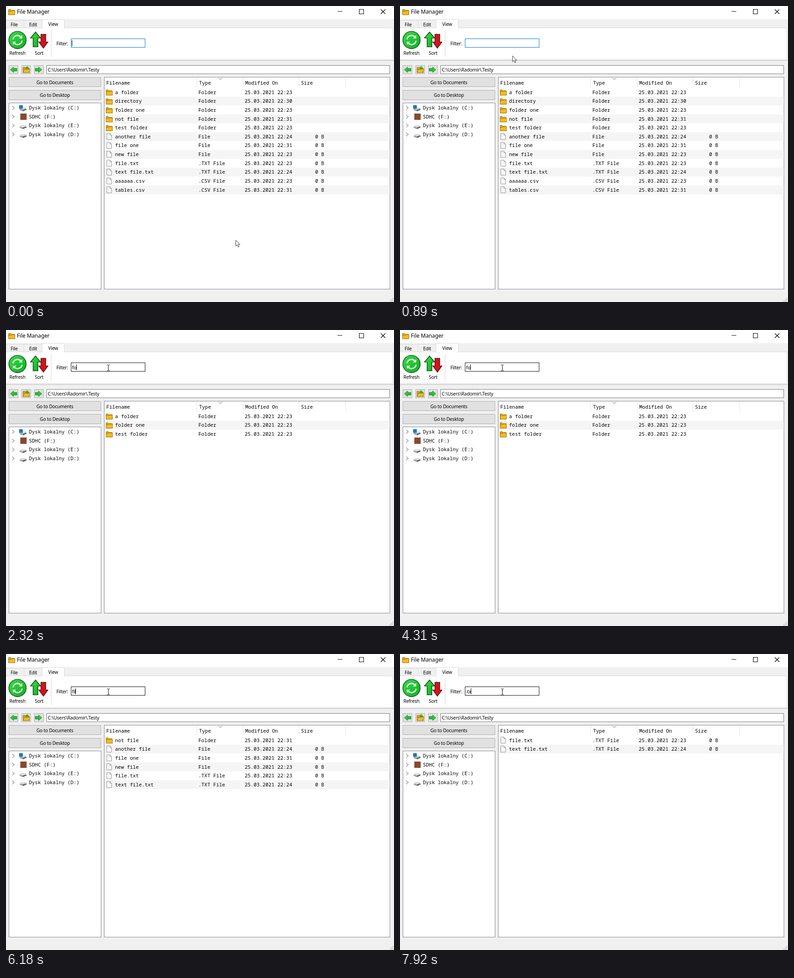
These frames come from a looping animation (855 px wide and 655 px high, 8 s). An HTML page:

```html
<!DOCTYPE html>
<html lang="en">
<head>
<meta charset="utf-8">
<title>File Manager</title>
<style>
  html, body { margin: 0; width: 100%; height: 100%; overflow: hidden; background: #f0f0f0; }
  svg { display: block; width: 855px; height: 655px; }
  text { white-space: pre; fill: #000; }
  .ui { font: 10.4px "Noto Sans", "Open Sans", sans-serif; letter-spacing: -.27px; }
  .path { letter-spacing: -.17px; }
  .title { font: 11.8px "Noto Sans", "Open Sans", sans-serif; }
  .mono { font: 10.92px "Noto Sans Mono", "DejaVu Sans Mono", monospace; }
  .mid { text-anchor: middle; }
</style>
</head>
<body>
<svg viewBox="0 0 855 655" xmlns="http://www.w3.org/2000/svg">
  <defs>
    <linearGradient id="green" x1="0" y1="0" x2="1" y2="1">
      <stop offset="0" stop-color="#35e044"/><stop offset="1" stop-color="#0fae22"/>
    </linearGradient>
    <linearGradient id="steel" x1="0" y1="0" x2="0" y2="1">
      <stop offset="0" stop-color="#c4c4c4"/><stop offset="1" stop-color="#777"/>
    </linearGradient>
    <g id="folder" stroke="#9a7310" stroke-width=".9">
      <path d="M.5 12.5V1.2Q.5.5 1.2.5H5L6.5 2.3H13.4Q14.5 2.3 14.5 3.4V12.5Z" fill="#d9a414"/>
      <path d="M.5 12.5V4.8H6L7.3 3.6H14.5V12.5Z" fill="#f1bb20"/>
    </g>
    <g id="page" stroke="#858585" stroke-width=".9">
      <path d="M.5.5H7.6L11.2 4.2V14.2H.5Z" fill="#f8f8f8"/>
      <path d="M7.6.5V4.2H11.2" fill="#ddd"/>
    </g>
    <g id="drive">
      <path d="M0 3.4L3.5.5H13L15 3Z" fill="#d2d2d2"/>
      <path d="M0 3.4L8 4.8L15 3V5.4L8 8.4L0 5.6Z" fill="#4c4c4c"/>
      <path d="M0 3.4L8 4.8V8.4L0 5.6Z" fill="url(#steel)"/>
      <path d="M10.5 5.6l2-.7" stroke="#49d14f" stroke-width="1.1"/>
    </g>
    <path id="arrow" d="M0 0L7.2-6V-2.9H14.5V2.9H7.2V6Z" fill="url(#green)" stroke="#14701c" stroke-width=".8"/>
  </defs>
  <g id="chrome"></g>
  <g id="list"></g>
  <rect id="address" x="89.5" y="131.5" width="756" height="18.5" fill="#fff"/>
  <text class="ui path" x="92" y="145">C:\Users\Radomir\.Testy</text>
  <rect id="filter" x="143.5" y="72.5" width="163" height="19" fill="#fff"/>
  <text id="query" class="ui" x="145.6" y="87"></text>
  <rect id="caret" y="76" width="1" height="13"/>
  <path id="pointer" d="M0 .3V13.2L3 10.5L5.2 15.4L7.3 14.4L5.1 9.8H9.2Z" fill="#fff" stroke="#1c2a1f" stroke-width=".9"/>
  <path id="beam" d="M-3-6.5H-1L0-5.6L1-6.5H3M0-5.6V5.6M-3 6.5H-1L0 5.6L1 6.5H3" fill="none" stroke="#000"/>
</svg>
<script>
const $ = id => document.getElementById(id);
const LOOP = 8000, ROW = 19.645;

const text = (x, y, s, cls = 'ui') => `<text class="${cls}" x="${x}" y="${y}">${s}</text>`;
const box = (x, y, w, h, fill, stroke = 'none') =>
  `<rect x="${x}" y="${y}" width="${w}" height="${h}" fill="${fill}" stroke="${stroke}"/>`;
const path = (d, stroke, fill = 'none', w = 1) =>
  `<path d="${d}" stroke="${stroke}" fill="${fill}" stroke-width="${w}"/>`;
const use = (id, x, y, more = '') => `<use href="#${id}" transform="translate(${x} ${y}) ${more}"/>`;

function titleBar() {
  return box(0, 0, 855, 29, '#fff') + use('folder', 5, 7) + text(24, 17, 'File Manager', 'title') +
    path('M730.5 12H741M778.5 7.5H788V17.5H778.5ZM826 7.5L836 17.5M836 7.5L826 17.5', '#000', 'none', 1.1);
}

function ribbon() {
  const swirl = 'M-10-1.5A10 10 0 0 1 6.5-7.6';
  const head = 'M10.2-10.8V-3.6H3Z';
  const half = path(swirl, '#fff', 'none', 2.6) + path(head, 'none', '#fff');
  return box(-.5, 48.5, 853, 70, '#fff', '#dcdcdc') +
    box(-.5, 31.5, 40, 17, '#f0f0f0', '#d9d9d9') + box(39.5, 31.5, 40, 17, '#f0f0f0', '#d9d9d9') +
    path('M79.5 49.5V29.5H128.5V49.5', '#d9d9d9', '#fff') + box(80, 47.5, 48, 3, '#fff') +
    text(10.3, 44.5, 'File') + text(51, 44.5, 'Edit') + text(93, 44, 'View') +
    `<circle cx="25.4" cy="75.3" r="19.2" fill="url(#green)" stroke="#0e4215" stroke-width="1.3"/>` +
    `<g transform="translate(25.4 75.3)">${half}<g transform="rotate(180)">${half}</g></g>` +
    path('M65 57.5L76.5 71H70.3V90.5H59.7V71H53.8Z', '#0c2a0f', 'url(#green)', 1.2) +
    path('M77 62.5H87.7V79.5H92.5L82.4 93.5L72.2 79.5H77Z', '#430707', '#d0141b', 1.2) +
    text(25.2, 108, 'Refresh', 'ui mid') + text(73, 108, 'Sort', 'ui mid') +
    path('M99.5 54V112', '#d5d5d5') + text(111, 87, 'Filter:') +
    path('M0 121H855', '#a0a0a0') + path('M0 122H855', '#fafafa');
}

function navigation() {
  const buttons = [6.5, 34.5, 62.5].map(x => box(x, 131.5, 20, 18.5, '#e1e1e1', '#adadad')).join('');
  return buttons + use('arrow', 9.5, 141) + use('arrow', 79, 141, 'scale(-1 1)') +
    use('folder', 37, 135) + use('arrow', 46.5, 133, 'rotate(90) scale(.55)') +
    path('M37.5 147.5L40.5 140H52.5L50 147.5Z', '#9a7310', '#f1bb20', .9) +
    box(6.5, 158, 202.5, 20.5, '#e1e1e1', '#adadad') + text(107.7, 173, 'Go to Documents', 'ui mid') +
    box(6.5, 186.5, 202.5, 21, '#e1e1e1', '#adadad') + text(107.7, 201, 'Go to Desktop', 'ui mid');
}

function tree() {
  const names = ['Dysk lokalny (C:)', 'SDHC (F:)', 'Dysk lokalny (E:)', 'Dysk lokalny (D:)'];
  const rows = names.map((name, i) => {
    const y = 225.3 + i * ROW;
    const icon = i === 1 ? box(31.5, y - 7, 14, 14, '#86492f') : use('drive', 30, y - 1);
    return path(`M13.8 ${y - 4}l4.4 4l-4.4 4`, '#8c8c8c', 'none', 1.2) + icon + text(50.5, y + 3.7, name, 'mono');
  });
  return box(6.5, 214.5, 203, 412, '#fff', '#828790') + rows.join('') + box(29, 219.5, 8, 8, '#1679c5');
}

function tableFrame() {
  const heads = [[221, 'Filename'], [425.5, 'Type'], [527.3, 'Modified On'], [650, 'Size']];
  return box(216.5, 157.5, 629.5, 469, '#fff', '#828790') +
    path('M420.5 158V181M522.5 158V181M645.5 158V181M748.5 158V181', '#e5e5e5') +
    path('M468.5 159.6l4 3l4-3', '#666') +
    heads.map(([x, s]) => text(x, 173.5, s, 'mono')).join('');
}

function grip() {
  let dots = '';
  for (let i = 0; i < 3; i++)
    for (let j = 2 - i; j < 3; j++) dots += box(845 + 3.2 * j, 645.5 + 3.2 * i, 2, 2, '#bcbcbc');
  return dots;
}

$('chrome').innerHTML = titleBar() + ribbon() + navigation() + tree() + tableFrame() + grip();

// name, type, minute part of the date
const files = [
  ['a folder', 'Folder', 23], ['directory', 'Folder', 30], ['folder one', 'Folder', 23],
  ['not file', 'Folder', 31], ['test folder', 'Folder', 23], ['another file', 'File', 24],
  ['file one', 'File', 31], ['new file', 'File', 23], ['file.txt', '.TXT File', 23],
  ['text file.txt', '.TXT File', 24], ['aaaaaa.csv', '.CSV File', 23], ['tables.csv', '.CSV File', 31]
];

function fileRow([name, type, minute], i) {
  const top = 181 + i * ROW, y = top + 13.6, isFolder = type === 'Folder';
  return (i % 2 ? box(217, top, 628.5, ROW, '#f5f5f5') : '') +
    (isFolder ? use('folder', 220, top + 4) : use('page', 221.5, top + 2.3)) +
    text(240.3, y, name, 'mono') + text(424, y, type, 'mono') +
    text(526, y, `25.03.2021 22:${minute}`, 'mono') + (isFolder ? '' : text(681.3, y, '0 B', 'mono'));
}

// start time, typed text, text the list is filtered by when it lags behind
const typing = [
  [0, ''], [2070, 'f'], [2320, 'fo'], [2570, 'fol'], [2690, 'fold'], [2940, 'folde'], [3130, 'folder'],
  [3690, 'folde'], [4250, 'fold'], [4310, 'fo'], [4370, ''],
  [4810, 'f'], [5120, 'fi'], [5430, 'fil'], [5620, 'file'], [6180, 'fil'], [6680, 'fi'], [6740, 'f'], [6810, ''],
  [7300, '.'], [7610, '.t', '.'], [7670, '.t'], [7920, '.tx']
];

// pointer places after the first sweep, one per step
const settle = [[244, 100], [238, 89], [232, 81], [228, 74], [225, 69], [224, 67], [224, 65],
  [224, 66], [224, 70], [225, 76], [225, 81], [225.5, 83.5]];

function pointerAt(t) {
  const step = t < 530 ? -1 : Math.min(18, Math.floor((t - 522) / 61.1));
  if (step > 6) return settle[step - 7];
  const u = (step + 1) / 7, e = u * u * (3 - 2 * u);
  return [506.5 - 258.5 * e, 518 - 408 * e];
}

const inside = (x, y, l, t, r, b) => x >= l && x <= r && y >= t && y <= b;
let shown = null;

function draw(t) {
  const [, typed, wanted = typed] = typing.findLast(k => k[0] <= t);
  if (wanted !== shown) {
    shown = wanted;
    $('list').innerHTML = files.filter(f => f[0].includes(wanted)).map(fileRow).join('');
  }
  $('query').textContent = typed;
  const width = typed ? $('query').getComputedTextLength() : 0;
  $('caret').setAttribute('x', Math.round(145.2 + width));
  $('caret').style.opacity = t >= 2070 || Math.floor(t / 530) % 2 === 0 ? 1 : 0;

  const [x, y] = pointerAt(t);
  const onFilter = inside(x, y, 143, 72, 307, 92), onAddress = inside(x, y, 89, 131, 846, 151);
  $('filter').setAttribute('stroke', onFilter ? '#111' : '#0078d7');
  $('address').setAttribute('stroke', onAddress ? '#171717' : '#7a7a7a');
  const beam = onFilter || onAddress;
  for (const [id, on] of [['beam', beam], ['pointer', !beam]]) {
    $(id).setAttribute('transform', `translate(${x} ${y})`);
    $(id).style.display = on ? '' : 'none';
  }
}

function tick() {
  draw(performance.now() % LOOP);
  requestAnimationFrame(tick);
}
tick();
</script>
</body>
</html>
```
